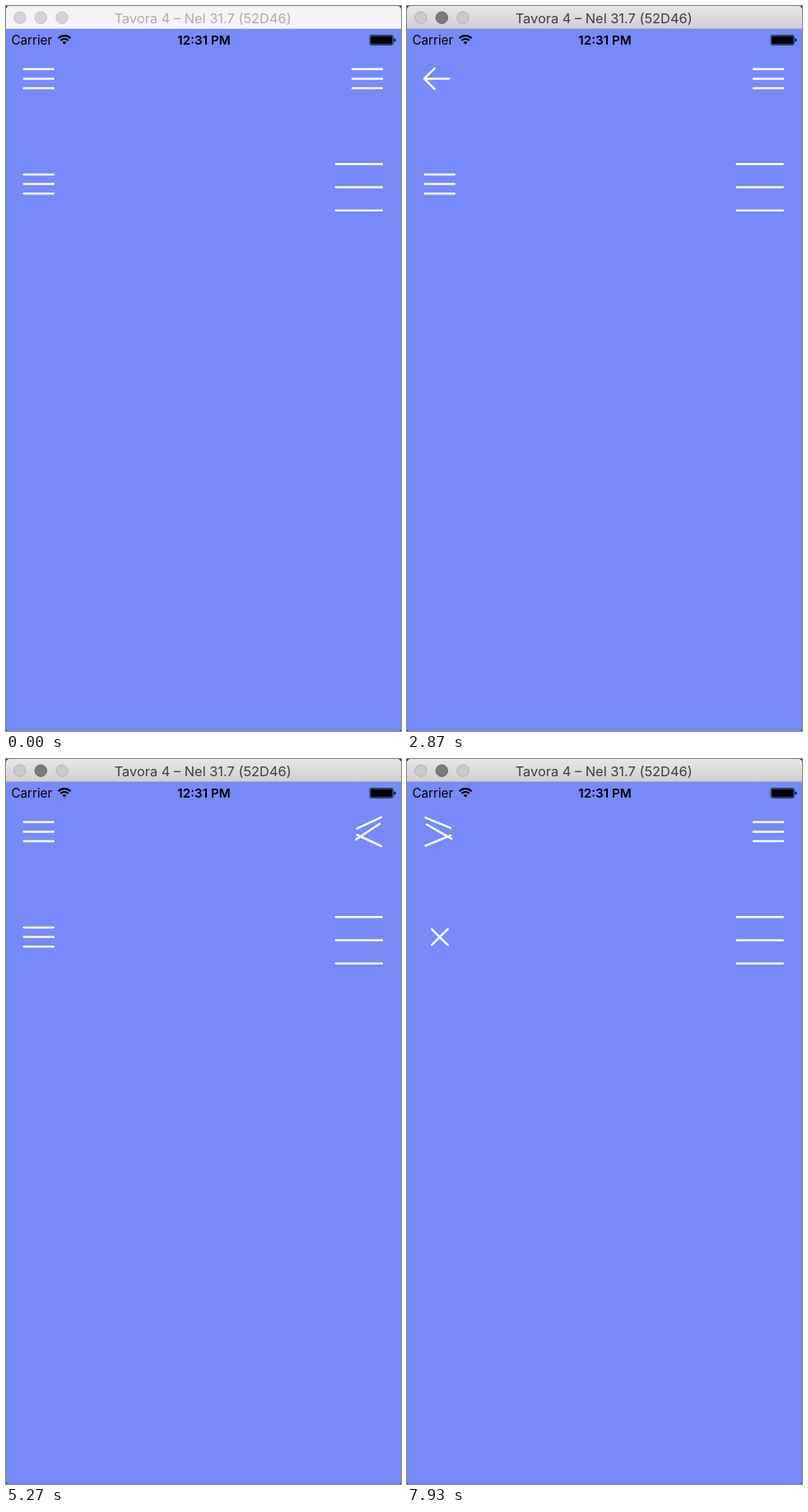
Animation of 480x882 px, one loop 8 s. Source, as an HTML page:

```html
<!DOCTYPE html>
<html lang="en">
<head>
<meta charset="utf-8">
<title>Menu buttons</title>
<style>
  html, body { margin: 0; height: 100%; overflow: hidden; background: #2b2f45; }
  svg { display: block; width: 100%; height: 100%; font-family: Inter, Roboto, sans-serif; }
  #title { font-size: 16.4px; text-anchor: middle; fill: #aeacae; }
  #bar { fill: #f5f3f5; }
  #edge { fill: #dbd9dc; }
  #dots circle { fill: #d5d3d5; stroke: #c4c2c4; }
  .active #title { fill: #3f3e40; }
  .active #bar { fill: url(#chrome); }
  .active #edge { fill: #b1aeb4; }
  .active #dots circle { fill: #cbc9cb; stroke: #b3b1b3; }
  .active #dots circle:nth-child(2) { fill: #7b797c; stroke: #69676a; }
  #status { font-size: 15.2px; }
  #lines { stroke: #fff; stroke-width: 2.5; stroke-linecap: round; }
</style>
</head>
<body>
<svg id="stage" viewBox="0 0 480 882">
  <defs>
    <linearGradient id="chrome" x2="0" y2="1">
      <stop stop-color="#e8e6e8"/><stop offset="1" stop-color="#d1cfd1"/>
    </linearGradient>
    <clipPath id="window"><path d="M0 5Q0 0 5 0H475Q480 0 480 5V879Q480 882 477 882H3Q0 882 0 879Z"/></clipPath>
  </defs>
  <g clip-path="url(#window)">
    <rect width="480" height="882" fill="#768af9"/>
    <rect id="bar" width="480" height="27"/>
    <rect id="edge" y="27" width="480" height="1"/>
  </g>
  <g id="dots">
    <circle cx="16.8" cy="14.2" r="7.2"/><circle cx="42.3" cy="14.2" r="7.2"/><circle cx="68" cy="14.2" r="7.2"/>
  </g>
  <text id="title" x="239.2" y="20.5">Tavora 4 – Nel 31.7 (52D46)</text>
  <g id="status">
    <text x="6.5" y="47">Carrier</text>
    <text x="240.5" y="47" text-anchor="middle" font-weight="600">12:31 PM</text>
    <g fill="none" stroke="#000" stroke-width="2.1">
      <path d="M63.6 39.2A10.4 10.4 0 0 1 78.4 39.2M66.3 41.9A6.6 6.6 0 0 1 75.7 41.9"/>
    </g>
    <path d="M71 46.8L68.6 44.2A3.5 3.5 0 0 1 73.4 44.2Z"/>
    <rect x="442" y="35.5" width="28.5" height="12" rx="2" fill="none" stroke="#000" stroke-opacity=".65"/>
    <rect x="443" y="36.5" width="26.5" height="10" rx="1"/>
    <path d="M471.6 39.3Q473.6 39.8 473.6 41.5T471.6 43.7Z"/>
  </g>
  <g id="lines">
    <path d="M400.7 192.2H456.8M400.7 220.4H456.8M400.7 248.7H456.8"/>
  </g>
</svg>
<script>
const LOOP = 8000, DURATION = 500, ACTIVATE = 1870;
const HALF = 18, GAP = 11.7;
const stage = document.getElementById('stage');

// Closed shapes: outer lines and middle line as half length and offset from the centre
const arrow = { outer: { half: 8.8, x: -12.5, y: 6.4 }, middle: { half: 15, x: -3.5 } };
const cross = { outer: { half: 13.9, x: 0, y: 0 }, middle: { half: 0, x: -20 } };

const buttons = [
  { x: 39.8, y: 88.4, side: 1, shape: arrow, taps: [1960, 2950, 7790] },
  { x: 439, y: 88.4, side: -1, shape: arrow, taps: [3990, 4920] },
  { x: 39.8, y: 216.6, side: 1, shape: cross, taps: [6162] }
];

for (const b of buttons) {
  b.path = document.createElementNS(stage.namespaceURI, 'path');
  document.getElementById('lines').append(b.path);
}

const mix = (a, b, p) => a + (b - a) * p;

// Cubic ease in and out with control points at .42 and .58
function ease(t) {
  t = Math.min(1, Math.max(0, t));
  let lo = 0, hi = 1;
  for (let i = 0; i < 24; i++) {
    const s = (lo + hi) / 2, r = 1 - s;
    if (1.26 * s * r * r + 1.74 * s * s * r + s ** 3 < t) lo = s; else hi = s;
  }
  return lo * lo * (3 - 2 * lo);
}

function line(x, y, half, degrees) {
  if (half < 0.05) return '';
  const a = degrees * Math.PI / 180, dx = half * Math.cos(a), dy = half * Math.sin(a);
  return `M${x - dx} ${y - dy}L${x + dx} ${y + dy}`;
}

function drawButton({ x, y, side, shape, taps, path }, t) {
  const turn = taps.reduce((sum, tap) => sum + ease((t - tap) / DURATION), 0);
  const p = 1 - Math.abs(1 - turn % 2);
  const { outer, middle } = shape;
  const half = mix(HALF, outer.half, p);
  const ox = x + side * outer.x * p, oy = mix(GAP, outer.y, p);
  path.setAttribute('d',
    line(ox, y - oy, half, side * 135 * p) +
    line(x + side * middle.x * p, y, mix(HALF, middle.half, p), 180 * turn) +
    line(ox, y + oy, half, -side * 135 * p));
}

const start = performance.now();
function frame() {
  const t = (performance.now() - start) % LOOP;
  stage.classList.toggle('active', t >= ACTIVATE);
  for (const b of buttons) drawButton(b, t);
  requestAnimationFrame(frame);
}
frame();
</script>
</body>
</html>
```
